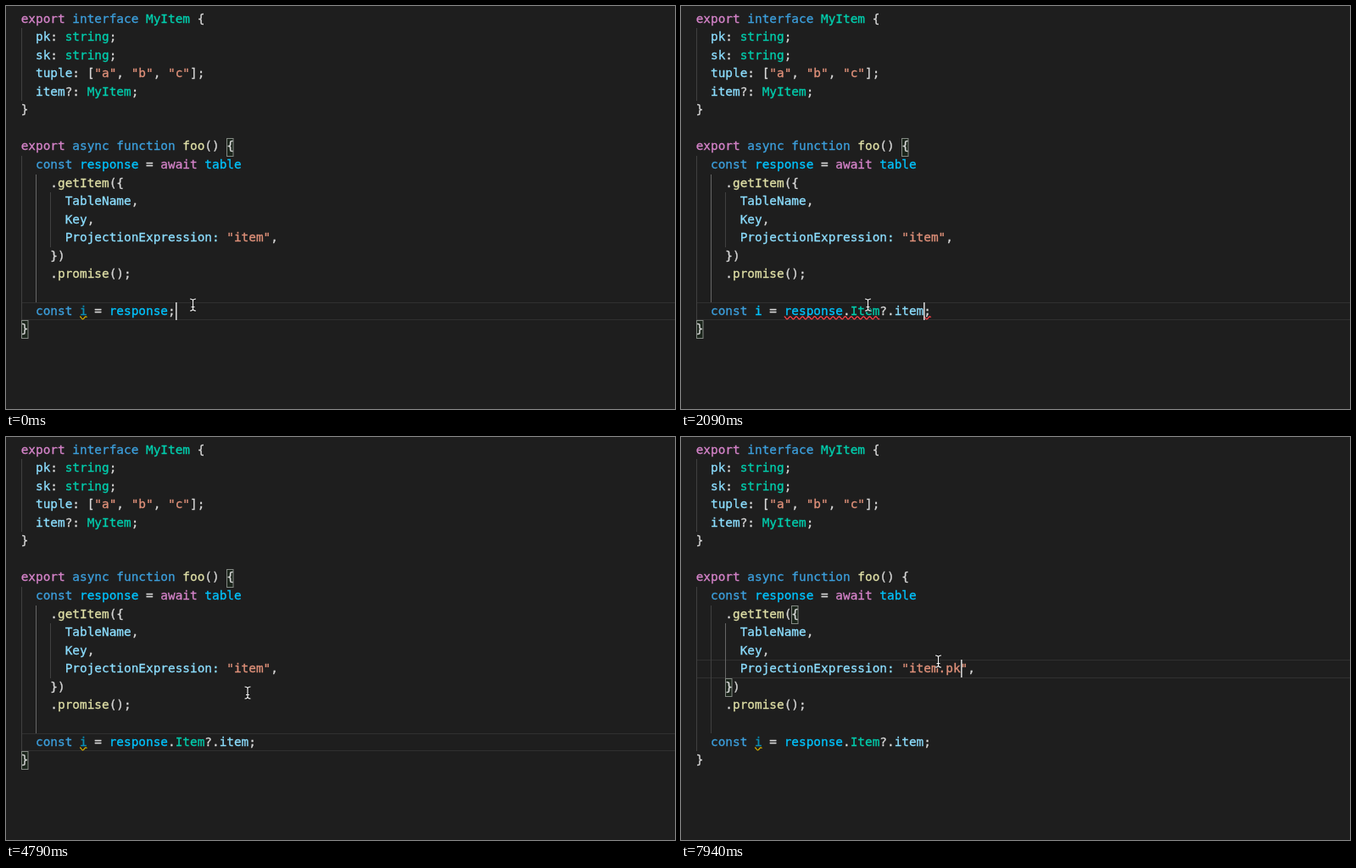
An HTML page with a canvas for the animation above (8000 ms loop, 789 px wide and 476 px high).

```html
<!DOCTYPE html>
<html lang="en">
<head>
<meta charset="utf-8">
<title>Typed response</title>
<style>
  html, body { margin: 0; width: 100%; height: 100%; overflow: hidden; background: #1e1e1e; }
  canvas { display: block; }
</style>
</head>
<body>
<canvas id="stage" width="789" height="476"></canvas>
<script>
const ctx = document.getElementById('stage').getContext('2d');
const LOOP = 8000, SIZE = 14.4, ROW = 21.56, LEFT = 17.7, TOP = 4.6;
const FONT = '"DejaVu Sans Mono", monospace';
ctx.font = `${SIZE}px ${FONT}`;
const CHAR = ctx.measureText('m').width;

// Colour keys used in marked-up text: "~" + key starts a new coloured run.
const COLORS = {
  w: '#d8d8d8', m: '#d583c9', b: '#3c9fdc', t: '#00cfae', s: '#e0917a',
  f: '#dfdfa6', p: '#8cdeff', c: '#00c4ff', d: '#0a8db4'
};
const CODE = [
  '~mexport~b interface~t MyItem~w {',
  '~p  pk~w: ~tstring~w;',
  '~p  sk~w: ~tstring~w;',
  '~p  tuple~w: [~s"a"~w, ~s"b"~w, ~s"c"~w];',
  '~p  item~w?: ~tMyItem~w;',
  '~w}',
  '',
  '~mexport~b async function~f foo~w() {',
  '~b  const~c response~w = ~mawait~c table',
  '~w    .~fgetItem~w({',
  '~p      TableName~w,',
  '~p      Key~w,',
  '',
  '~w    })',
  '~w    .~fpromise~w();',
  '',
  '',
  '~w}'
];
const MEMBERS = [
  '~ppk~w: ~tS~w<~tstring~w>;',
  '~psk~w: ~tS~w<~tstring~w>;',
  '~ptuple~w: ~tL~w<[~tS~w<~s"a"~w>, ~tS~w<~s"b"~w>, ~tS~w<~s"c"~w>]>;',
  '~pitem~w?: ~tM~w<...> | ~tundefined~w;'
];
const indent = (lines, n) => lines.map(line => '~w' + ' '.repeat(n) + line);
const ITEM_TIP = [
  '~w(~pproperty~w) ~pItem~w?: {', '~p    item~w?: ~fM~w<{', ...indent(MEMBERS, 8),
  '~w    }> | ~bundefined~w;', '~w} | ~bundefined'
];
const FIELD_TIP = ['~w(~pproperty~w) ~pitem~w?: ~fM~w<{', ...indent(MEMBERS, 4), '~w}> | ~bundefined'];

// Step tables: [start time, values...]
const MOUSE = [
  [0, 220.5, 353], [3140, 221, 354], [3440, 230, 355], [3590, 258.5, 356], [3740, 265.5, 356],
  [4490, 268, 345], [4640, 276, 322], [4790, 285, 302], [4940, 293, 286], [5090, 299, 274], [5240, 303.5, 265]
];
const CARET = [
  [0, 21], [300, 20], [600, 21], [1200, 25], [1350, 26], [1940, 31],
  [5240, 33], [6290, 34], [7790, 35], [7940, 36]
];
const MEMBER = [
  [0, ''], [600, '~w.'], [1200, '~w.~tItem'], [1350, '~w.~tItem~w.'], [1940, '~w.~tItem~w?.~pitem']
];
const PATH = [[0, 'item'], [6290, 'item.'], [7790, 'item.p'], [7940, 'item.pk']];
const CARET_OFF = [[2690, 3140], [3590, 4190], [4640, 5090], [5690, 6290], [6740, 7340]];

const at = (steps, t) => steps.findLast(step => step[0] <= t).slice(1);
const within = (t, from, to) => t >= from && t < to;
const colX = col => LEFT + col * CHAR;
const rowY = row => TOP + row * ROW;

function rect(color, x, y, w, h) {
  ctx.fillStyle = color;
  ctx.fillRect(x, y, w, h);
}

function frame(fill, border, x, y, w, h) {
  rect(fill, x, y, w, h);
  ctx.strokeStyle = border;
  ctx.lineWidth = 1;
  ctx.strokeRect(x, y, w, h);
}

// A hairline outline gives the glyphs their slightly heavy smoothing.
function text(str, x, baseline, color, size = SIZE) {
  ctx.font = `${size}px ${FONT}`;
  ctx.fillStyle = ctx.strokeStyle = color;
  ctx.lineWidth = .3;
  ctx.fillText(str, x, baseline);
  ctx.strokeText(str, x, baseline);
}

function markup(line, x, baseline) {
  for (const run of line.split('~').filter(Boolean)) {
    const str = run.slice(1);
    text(str, x, baseline, COLORS[run[0]]);
    x += str.length * CHAR;
  }
}

function guide(col, firstRow, endRow, active) {
  const top = Math.round(rowY(firstRow));
  rect(active ? '#666' : '#404040', Math.round(colX(col)), top, 1, Math.round(rowY(endRow)) - top);
}

function bracket(col, row) {
  frame('rgba(0,100,0,.1)', '#848a84', Math.round(colX(col)) + .5, Math.round(rowY(row)) + .5, 7.5, 21);
}

function polyline(points, color, width) {
  ctx.beginPath();
  points.forEach(([x, y]) => ctx.lineTo(x, y));
  ctx.strokeStyle = color;
  ctx.lineWidth = width;
  ctx.stroke();
}

function squiggle(col, endCol, color) {
  const points = [];
  for (let x = colX(col); x <= colX(endCol); x += .5) {
    points.push([x, 368.3 - 1.5 * Math.cos((x - colX(col)) * Math.PI * 2 / 7.2)]);
  }
  polyline(points, color, 1.3);
}

function fieldIcon(x, y, color) {
  const place = points => points.map(([dx, dy]) => [x + dx, y + dy]);
  polyline(place([[-8, -2], [1, -6.5], [8, -3], [8, 2.5], [-1, 7], [-8, 3], [-8, -2], [-1, 1.5], [8, -3]]), color, 1.2);
  polyline(place([[-1, 1.5], [-1, 7]]), color, 1.2);
}

function suggestions(col, names, detail) {
  const x = Math.round(colX(col)) + .5, y = 371.5;
  frame('#252526', '#454545', x, y, 517, names.length * ROW + 4.3);
  names.forEach((name, i) => {
    const top = y + i * ROW, selected = i === names.length - 1;
    if (selected) {
      rect('#004872', x + .5, Math.round(top + 1), 516, 21);
      text(detail, x + 166.5, Math.round(top + 15), '#c0d1dc', SIZE * .85);
    }
    fieldIcon(x + 12.5, top + 11.5, selected ? '#fff' : '#5fbfff');
    text(name, x + 27, Math.round(top + 15.9), selected ? '#fff' : '#d8d8d8');
  });
}

function tooltip(lines, x, y, w, h) {
  frame('#252526', '#454545', x, y, w, h);
  lines.forEach((line, i) => markup(line, x + 9.7, y + 20.5 + i * 21));
}

function pointer(x, y) {
  const beam = (color, width) => {
    ctx.beginPath();
    for (const side of [-1, 1]) {
      ctx.moveTo(x + side * 3.5, y - 7);
      ctx.quadraticCurveTo(x, y - 7, x, y - 4.5);
      ctx.lineTo(x, y + 4.5);
      ctx.quadraticCurveTo(x, y + 7, x + side * 3.5, y + 7);
    }
    ctx.moveTo(x - 2, y + 2.5);
    ctx.lineTo(x + 2, y + 2.5);
    ctx.strokeStyle = color;
    ctx.lineWidth = width;
    ctx.stroke();
  };
  beam('#111', 3);
  beam('#f4f4f4', 1.2);
}

function draw(t) {
  const editingPath = t >= 5240, row = editingPath ? 12 : 16;
  const unused = !within(t, 1500, 2690);
  const itemTip = within(t, 3290, 3890), fieldTip = within(t, 3890, 4640);

  rect('#1e1e1e', 0, 0, 789, 476);
  for (const edge of [row, row + 1]) rect('#303030', 18, Math.round(rowY(edge)) - (edge > row ? 1 : 0), 771, 1);
  guide(0, 1, 5);
  guide(0, 8, 17);
  guide(2, 9, 16, !editingPath);
  guide(4, 10, 13, editingPath);
  if (editingPath) { bracket(13, 9); bracket(4, 13); }
  else { bracket(28, 7); bracket(0, 17); }

  if (itemTip) rect('#20303a', colX(21), 350, CHAR * 4, 21);
  if (fieldTip) rect('#20303a', colX(27), 350, CHAR * 4, 21);
  if (within(t, 5540, 6290)) rect('#4c4c4c', colX(29), 263, CHAR * 4, 21);

  const lines = [...CODE];
  lines[12] = `~p      ProjectionExpression: ~s"${at(PATH, t)[0]}"~w,`;
  lines[16] = `~b  const ~${unused ? 'd' : 'c'}i~w = ~cresponse${at(MEMBER, t)[0]}~w;`;
  lines.forEach((line, i) => markup(line, LEFT, Math.floor(rowY(i) + 15.45)));

  if (unused) squiggle(8, 9, '#cca700');
  if (within(t, 2090, 2690)) {
    squiggle(12, 25, '#ff4048');
    squiggle(31, 32, '#ff4048');
  }
  if (!CARET_OFF.some(([from, to]) => within(t, from, to))) {
    rect('#d0d0d0', Math.round(colX(at(CARET, t)[0])), Math.round(rowY(row)), 1.6, 21);
  }

  if (within(t, 750, 1200)) {
    suggestions(21, ['$response', 'ConsumedCapacity?', 'Item?'], '(type parameter) Item? in GetItemOutput?<Ite…');
  }
  if (within(t, 1500, 1940)) suggestions(26, ['item?'], '(property) item?: M<{ pk: S<string>; sk: S<s…');
  if (itemTip) tooltip(ITEM_TIP, 200.5, 172.5, 393, 179);
  if (fieldTip) tooltip(FIELD_TIP, 252.5, 214.5, 358, 137);
  pointer(...at(MOUSE, t));
}

function tick() {
  draw(performance.now() % LOOP);
  requestAnimationFrame(tick);
}
tick();
</script>
</body>
</html>
```
